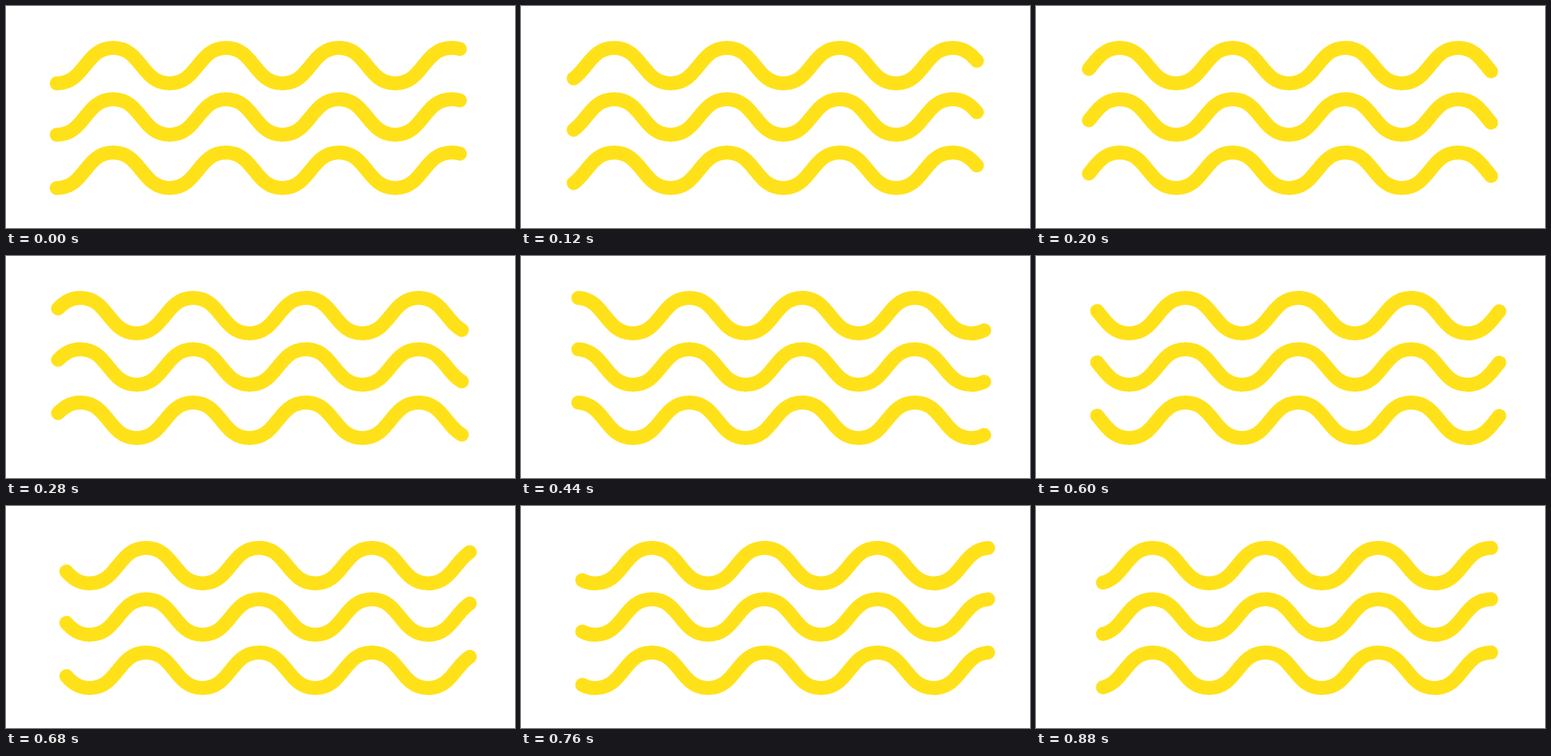
Recreate the animation shown at these times as an HTML page. Size 800 px wide and 350 px high, loop 0.92 s.

```html
<!DOCTYPE html>
<html lang="en">
<head>
<meta charset="utf-8">
<title>Waves</title>
<style>
  html, body {
    margin: 0;
    width: 100%;
    height: 100%;
    overflow: hidden;
    background: #fff;
  }
  svg {
    display: block;
    width: 800px;
    height: 350px;
  }
  /* The waves slide left while a dash of fixed length runs along them to the right. */
  .waves {
    fill: none;
    stroke: #ffe11a;
    stroke-width: 22;
    stroke-linecap: round;
    stroke-dasharray: 783 2000;
    animation: flow 920ms steps(23) infinite;
  }
  @keyframes flow {
    from { transform: translateX(0); stroke-dashoffset: 5.2px; }
    to { transform: translateX(-169.9px); stroke-dashoffset: -239.9px; }
  }
</style>
</head>
<body>
<svg viewBox="0 0 800 350">
  <defs>
    <path id="wave" d="M79.85 122
      c44.325 0 44.325 -56 88.65 -56
      s44.325 56 88.65 56 s44.325 -56 88.65 -56
      s44.325 56 88.65 56 s44.325 -56 88.65 -56
      s44.325 56 88.65 56 s44.325 -56 88.65 -56
      s44.325 56 88.65 56 s44.325 -56 88.65 -56"/>
  </defs>
  <g class="waves">
    <use href="#wave"/>
    <use href="#wave" y="81"/>
    <use href="#wave" y="165"/>
  </g>
</svg>
</body>
</html>
```
